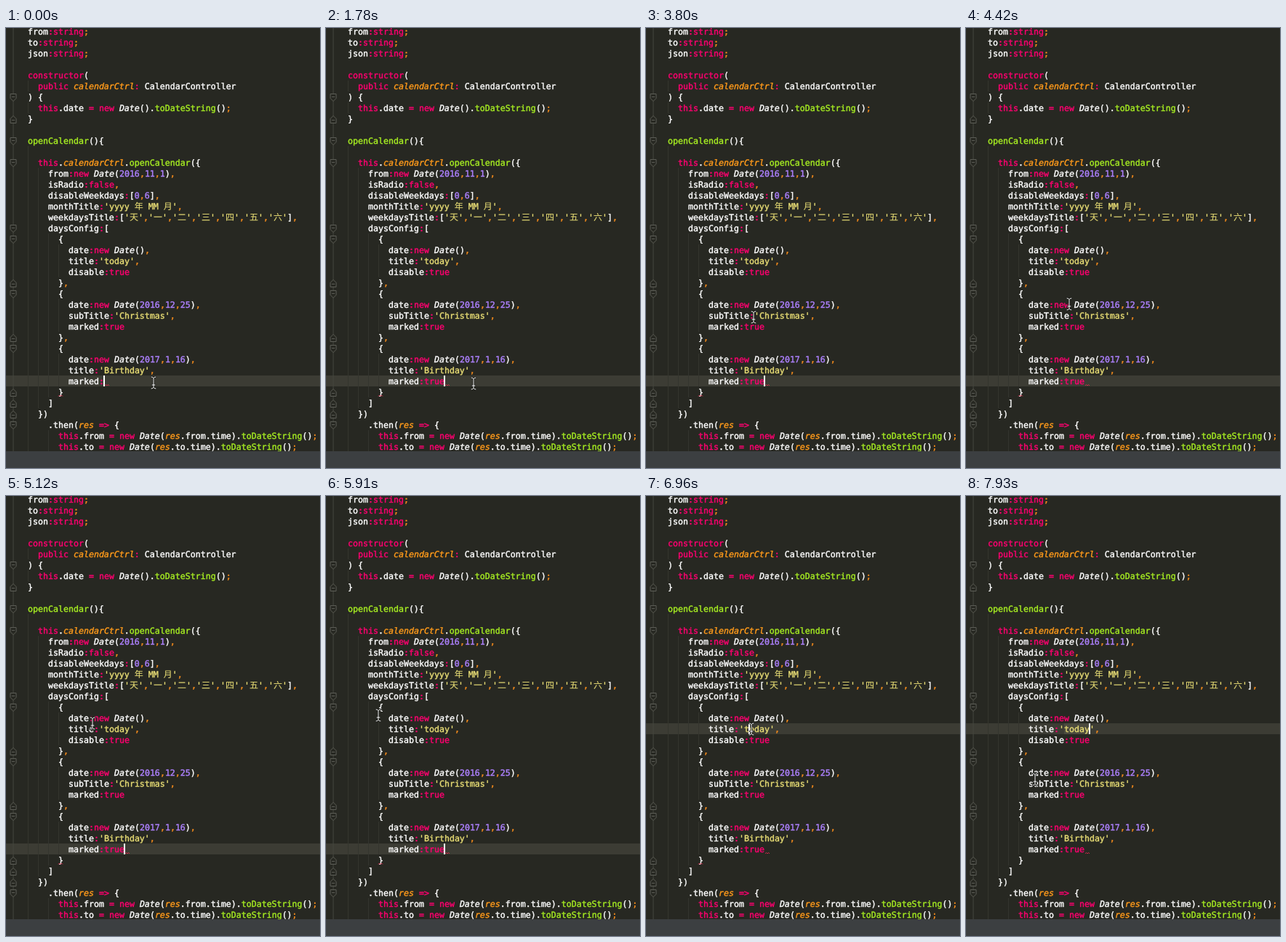
An HTML page that plays this animation: 432x604 px, repeating every 8 s.

```html
<!DOCTYPE html>
<html lang="en">
<head>
<meta charset="utf-8">
<title>Editor</title>
<style>
  html, body { margin: 0; width: 100%; height: 100%; overflow: hidden; background: #272822; }
  svg { display: block; width: 432px; height: 604px; }
  text {
    font: 11.627px "DejaVu Sans Mono", "Liberation Mono", monospace;
    white-space: pre;
    text-rendering: geometricPrecision;
    fill: #fff;
    stroke: #fff;
    stroke-width: .4px;
  }
  .key { fill: #ff0070; stroke: #ff0070; }
  .str { fill: #e6db74; stroke: #e6db74; }
  .num { fill: #ae81ff; stroke: #ae81ff; }
  .fn { fill: #a6ec22; stroke: #a6ec22; }
  .var { fill: #ff9a1a; stroke: #ff9a1a; font-style: italic; }
  .type { font-style: italic; }
  .sep { fill: #f28a1c; stroke: #f28a1c; }
  .han { font: 12px "Noto Sans CJK SC", "Noto Sans CJK JP", sans-serif; stroke-width: .1px; }
  .guide { stroke: #34352e; }
  .fold { fill: #272822; stroke: #5c5d56; }
  .wave { fill: none; stroke: #d02a4c; }
  #mouse { fill: none; stroke-linecap: round; }
</style>
</head>
<body>
<svg viewBox="0 0 432 604">
  <defs>
    <path id="beam" d="M-3-8Q-.5-8 0-6.5Q.5-8 3-8M0-6.5V6.5M-3 8Q-.5 8 0 6.5Q.5 8 3 8M-2 3H2"/>
    <path id="squiggle" d="M0 0l1.5-1.5 1.5 1.5 1.5-1.5 1.5 1.5"/>
  </defs>
  <rect width="432" height="604" fill="#272822"/>
  <rect id="band" width="432" height="15" fill="#3c3c34"/>
  <rect id="pick" x="135" y="312" width="35" height="15" fill="#4b4a3e"/>
  <g id="gutter"></g>
  <g id="code"></g>
  <use id="typo" class="wave" href="#squiggle"/>
  <use id="brace" class="wave" href="#squiggle" x="72" y="505.5"/>
  <rect id="caret" width="2" height="15" fill="#fff"/>
  <rect y="581" width="432" height="23" fill="#3c3f41"/>
  <g id="mouse">
    <use href="#beam" stroke="#151612" stroke-width="2.6"/>
    <use href="#beam" stroke="#fff"/>
  </g>
</svg>
<script>
const $ = id => document.getElementById(id);
const LOOP = 8000, STEP = 88, BLINK = 500;
const ROW = 15, COL = 7, LEFT = 30, BOTTOM = 581;

const lines = `from:string;
to:string;
json:string;

constructor(
  public calendarCtrl: CalendarController
) {
  this.date = new Date().toDateString();
}

openCalendar(){

  this.calendarCtrl.openCalendar({
    from:new Date(2016,11,1),
    isRadio:false,
    disableWeekdays:[0,6],
    monthTitle:'yyyy 年 MM 月',
    weekdaysTitle:['天','一','二','三','四','五','六'],
    daysConfig:[
      {
        date:new Date(),
        title:'today',
        disable:true
      },
      {
        date:new Date(2016,12,25),
        subTitle:'Christmas',
        marked:true
      },
      {
        date:new Date(2017,1,16),
        title:'Birthday',
        marked:
      }
    ]
  })
    .then(res => {
      this.from = new Date(res.from.time).toDateString();
      this.to = new Date(res.to.time).toDateString();`.split('\n');

const TYPED = lines.findIndex(line => line.endsWith('marked:'));
const TODAY = lines.findIndex(line => line.includes('today'));

const token = new RegExp([
  "(?<str>'[^']*')",
  "(?<fn>\\b(?:toDateString|openCalendar)\\b)",
  "(?<key>\\b(?:string|constructor|public|this|new|true|false)\\b|=>|[:=])",
  "(?<var>\\b(?:calendarCtrl|res)\\b)",
  "(?<type>\\bDate\\b)",
  "(?<num>\\b\\d+\\b)",
  "(?<sep>[;,])"
].join('|'), 'g');

const span = (cls, s) => `<tspan class="${cls}">${s}</tspan>`;
const indentX = line => LEFT + COL * line.search(/\S|$/);

function paint(line) {
  return line.trim().replace(token, (s, ...rest) => {
    const groups = rest[rest.length - 1];
    const cls = Object.keys(groups).find(k => groups[k] !== undefined);
    return span(cls, s.replace('>', '&gt;').replace(/[\u4e00-\u9fff]/g, c => span('han', c)));
  });
}

$('code').innerHTML = lines.map((line, i) =>
  `<text x="${indentX(line)}" y="${i * ROW + 9}">${paint(line)}</text>`).join('');
const typedRow = $('code').children[TYPED];

// Fold marks and indent guides follow from the brackets
const fold = (row, dir) => `<path class="fold" transform="translate(10 ${row * ROW + 5.5}) scale(1 ${dir})"
  d="M-4-5H4V1L0 5L-4 1ZM-2-1H2"/>`;
const guide = ([x, y], end) => `<path class="guide" d="M${x + .5} ${y}V${end}"/>`;

function drawGutter() {
  const open = [];
  let guides = '', folds = '';
  lines.forEach((line, i) => {
    if (/^\s*[)}\]]/.test(line)) guides += guide(open.pop(), i * ROW - 3);
    if (/^\s*[}\]]/.test(line)) folds += fold(i, -1);
    if (/[({[]$/.test(line)) open.push([indentX(line), i * ROW + 12]);
    if (/[{[]$/.test(line)) folds += fold(i, 1);
  });
  guides += open.map(o => guide(o, BOTTOM)).join('');
  $('gutter').innerHTML = `${guides}<path d="M10 0V${BOTTOM}" stroke="#45463f"/>${folds}`;
}
drawGutter();

const keys = [810, 1250, 1510, 1780];
const CLICK = 6260, CLICK2 = 6870, SELECT = 7140, FIXED = 7680;
const actions = [-140, ...keys, CLICK, CLICK2, SELECT];

// Pointer stops: time, x, y
const stops = [
  [0, 203, 487], [3500, 203, 489], [3780, 148, 397], [4200, 148, 395], [4920, 114, 310],
  [5100, 119, 312], [5650, 76, 276], [5890, 72, 301], [6250, 157, 305], [6510, 145, 320],
  [7550, 145, 320], [7920, 95, 389]
];

function pointer(t) {
  const i = stops.findIndex(s => s[0] > t);
  const [t1, ...to] = stops.at(i);
  if (i < 0) return to;
  const [t0, ...from] = stops[i - 1];
  const u = (t - t0) / (t1 - t0), k = u * u * (3 - 2 * u);
  return from.map((v, j) => Math.round(v + (to[j] - v) * k));
}

const show = (id, on) => $(id).setAttribute('visibility', on ? 'visible' : 'hidden');
const place = (id, x, y) => $(id).setAttribute('transform', `translate(${x} ${y})`);

let shown = -1;

function draw(t) {
  const typed = keys.filter(k => k <= t).length;
  if (typed !== shown) {
    typedRow.innerHTML = paint(lines[TYPED] + 'true'.slice(0, typed));
    shown = typed;
  }
  const end = indentX(lines[TYPED]) + COL * ('marked:'.length + typed);
  const [row, x] = t < CLICK ? [TYPED, end]
    : t < CLICK2 ? [TODAY - 1, 156]
    : [TODAY, t < SELECT ? 142 : 170];
  const top = row * ROW - 3;
  const idle = t - actions.findLast(a => a <= t);

  place('band', 0, top);
  place('caret', x - 1, top);
  place('typo', end + 1, 491);
  show('caret', t >= SELECT || idle % (2 * BLINK) < BLINK);
  show('pick', t >= SELECT);
  show('brace', t < FIXED);
  place('mouse', ...pointer(Math.floor(t / STEP) * STEP));
}

const start = performance.now();
function tick() {
  draw((performance.now() - start) % LOOP);
  requestAnimationFrame(tick);
}
tick();
</script>
</body>
</html>
```
